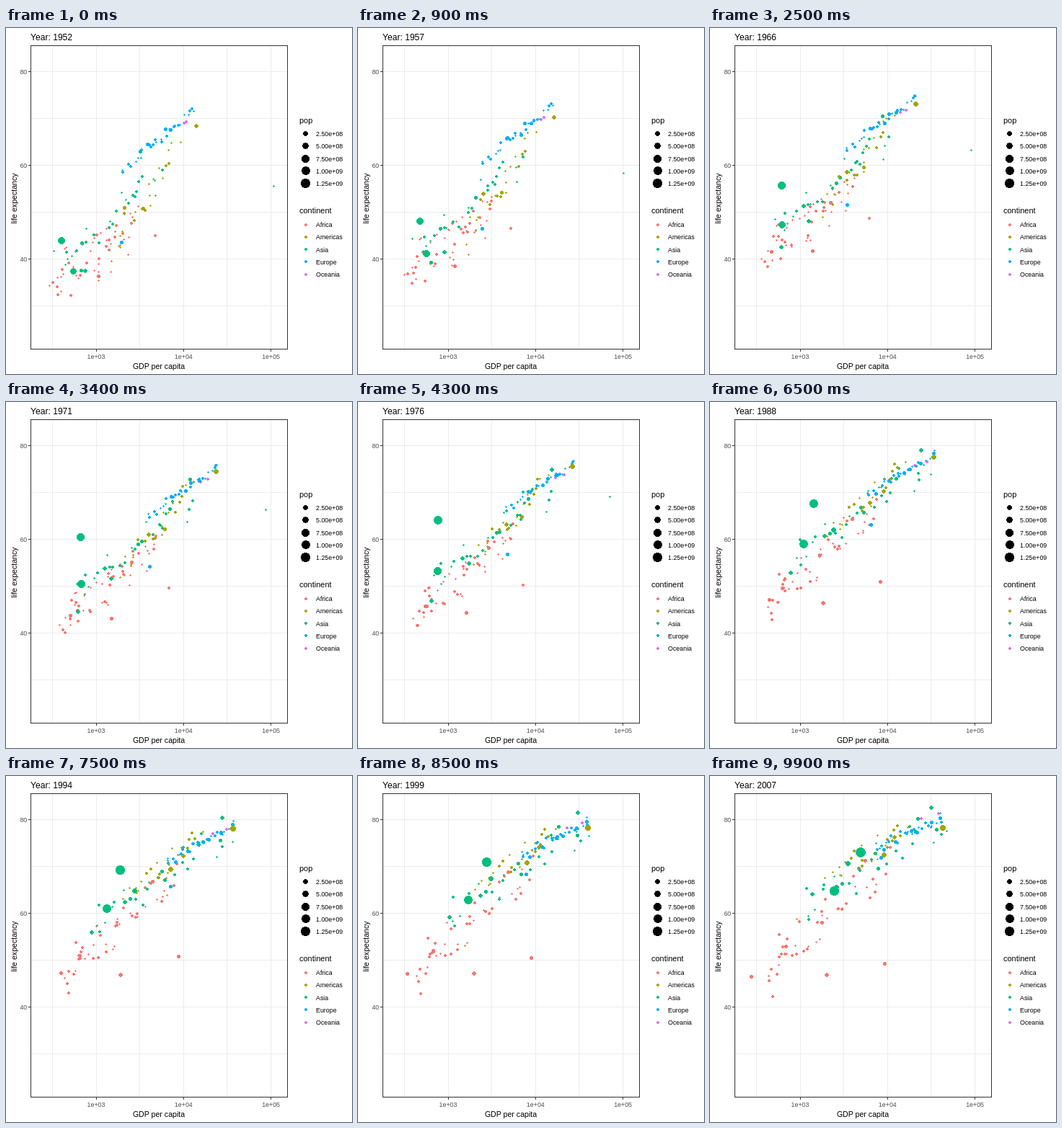
Write an HTML page with a canvas that moves like this. It is 480 px wide and 480 px high and loops after 10 s.

```html
<!DOCTYPE html>
<html lang="en">
<head>
<meta charset="utf-8">
<title>Life expectancy and GDP</title>
<style>
  html, body { margin: 0; width: 100%; height: 100%; overflow: hidden; background: #fff; }
  canvas, svg { position: absolute; left: 0; top: 0; width: 480px; height: 480px; }
  text { font-family: "Liberation Sans", Arial, sans-serif; font-size: 8.9px; }
  .tick { fill: #4d4d4d; }
  .name { font-size: 10.6px; }
  .head { font-size: 11px; }
  #year { font-size: 12.1px; }
</style>
</head>
<body>
<canvas id="stage" width="480" height="480"></canvas>
<svg id="labels" viewBox="0 0 480 480">
  <text id="year" x="34" y="17">Year: 1952</text>
  <text class="name" x="212" y="473" text-anchor="middle">GDP per capita</text>
  <text class="name" transform="translate(15 236.5) rotate(-90)" text-anchor="middle">life expectancy</text>
  <text class="head" x="407" y="132">pop</text>
  <text class="head" x="407" y="257">continent</text>
</svg>
<script>
const ctx = document.getElementById('stage').getContext('2d');
const labels = document.getElementById('labels');
const yearText = document.getElementById('year');

const LOOP = 10000, STEP = 100, LAST = 99;

// Small dots of a continent run from poor to rich along a line, with noise in years of life.
// start, end: lowest and highest log10 GDP, then the matching life expectancy.
// bend: extra log10 GDP and years of life mid-way; born: starting share of the final population.
const groups = {
  Africa: {
    color: '#F8766D', n: 46, pop: 13, born: 0.28, skew: 1.5, noise: 7, bend: [0.24, 14],
    start: [2.5, 3.5, 35, 46], end: [2.65, 4.05, 47, 70]
  },
  Americas: {
    color: '#A3A500', n: 22, pop: 12, born: 0.4, skew: 1, noise: 3.5, bend: [0.28, 12],
    start: [3.15, 3.95, 41, 65], end: [3.3, 4.25, 68, 78]
  },
  Asia: {
    color: '#00BF7D', n: 26, pop: 24, born: 0.42, skew: 1, noise: 5, bend: [0.3, 12],
    start: [2.55, 3.75, 38, 59], end: [2.95, 4.65, 60, 80]
  },
  Europe: {
    color: '#00B0F6', n: 28, pop: 16, born: 0.75, skew: 1, noise: 1.8, bend: [0.45, 4],
    start: [3.3, 4.15, 59, 72], end: [3.85, 4.65, 73.5, 81]
  },
  Oceania: {
    color: '#E76BF3', n: 2, pop: 12, born: 0.45, skew: 1, noise: 0, bend: [0.25, -3],
    start: [4, 4.03, 69, 69.4], end: [4.35, 4.6, 80, 81.4]
  }
};

// Leading dots: population in millions, then GDP and life expectancy at evenly spaced times
const leaders = {
  Africa: [
    [135, 1077, 36.3, 2014, 46.9], [80, 1419, 41.9, 5581, 71.3], [76, 362, 34.1, 691, 52.9],
    [65, 781, 39.1, 278, 46.5], [44, 4725, 45, 9270, 49.3]
  ],
  Asia: [
    [1110, 547, 37.4, 834, 55.1, 2452, 64.7],
    [1319, 400, 44, 590, 53, 700, 63.5, 1215, 66.6, 2150, 70, 4959, 73],
    [224, 750, 37.5, 3541, 70.6], [169, 685, 43.4, 2606, 65.5],
    [150, 684, 37.5, 668, 48.5, 1391, 64.1], [127, 3217, 63, 18000, 76.2, 31656, 82.6],
    [3, 108382, 55.6, 92500, 61.4, 85500, 68.3, 29000, 73, 39000, 75.9, 47307, 77.6]
  ],
  Oceania: [],
  Europe: [[82, 7144, 67.5, 32170, 79.4], [71, 1969, 43.6, 8458, 71.8]],
  Americas: [
    [190, 2109, 50.9, 9066, 72.4], [109, 3478, 50.8, 11978, 76.2], [301, 13990, 68.4, 42952, 78.2]
  ]
};

let seed = 11;
function rand() {
  seed = (seed * 16807) % 2147483647;
  return seed / 2147483647;
}
const spread = () => rand() + rand() - 1;
const mix = (a, b, t) => a + (b - a) * t;

function along([poor, rich, low, high], u, noise) {
  return [mix(poor, rich, u) + spread() * noise / 50, mix(low, high, u) + spread() * noise];
}

const dots = [];
for (const name in leaders) {
  const group = groups[name];
  for (let i = 0; i < group.n; i++) {
    const u = (i + rand()) / group.n;
    const points = [
      along(group.start, u, group.noise),
      along(group.end, Math.pow(u, group.skew), group.noise)
    ];
    dots.push({ group, points, pop: group.pop * 3 * rand() ** 2 });
  }
  for (const [pop, ...row] of leaders[name]) {
    const points = [];
    for (let i = 0; i < row.length; i += 2) points.push([Math.log10(row[i]), row[i + 1]]);
    dots.push({ group, points, pop });
  }
}

const xAt = log => 125 + 121.3 * (log - 3);
const yAt = life => 580.5 - 6.5 * life;
const radius = pop => 1.42 + 5.33 * Math.sqrt(pop / 1319);

function place(dot, t, axis) {
  const p = dot.points, n = p.length - 1;
  if (n > 2) {
    const i = Math.min(n - 1, Math.floor(t * n));
    return mix(p[i][axis], p[i + 1][axis], t * n - i);
  }
  const a = p[0][axis], b = p[n][axis];
  const bend = n === 2 ? 4 * p[1][axis] - 2 * (a + b) : dot.group.bend[axis];
  return mix(a, b, t) + bend * t * (1 - t);
}

// Hard-edged disc on whole pixels
function disc(x, y, r, color) {
  const d = Math.max(3, Math.round(2 * r)), h = d / 2;
  const left = Math.round(x - h), top = Math.round(y - h);
  ctx.fillStyle = color;
  for (let j = 0; j < d; j++) {
    const dy = j + 0.5 - h;
    let inset = 0;
    while (inset < h && (inset + 0.5 - h) ** 2 + dy * dy > h * h - 0.6) inset++;
    if (d > 2 * inset) ctx.fillRect(left + inset, top + j, d - 2 * inset, 1);
  }
}

function label(text, x, y, anchor, cls) {
  const el = document.createElementNS(labels.namespaceURI, 'text');
  el.setAttribute('x', x);
  el.setAttribute('y', y);
  el.setAttribute('text-anchor', anchor);
  if (cls) el.setAttribute('class', cls);
  el.textContent = text;
  labels.append(el);
}

const names = Object.keys(groups);
const sizes = [250, 500, 750, 1000, 1250];
const sizeY = i => 146.5 + 17.25 * i;
const nameY = i => 272.5 + 17.25 * i;

[3, 4, 5].forEach(e => label('1e+0' + e, xAt(e), 459, 'middle', 'tick'));
[40, 60, 80].forEach(v => label(v, 29.3, yAt(v) + 3.8, 'end', 'tick'));
sizes.forEach((p, i) => label((p * 1e6).toExponential(2).replace(/\+(\d)$/, '+0$1'), 430, sizeY(i) + 3.5, 'start'));
names.forEach((n, i) => label(n, 430, nameY(i) + 3.5, 'start'));

function drawBack() {
  ctx.fillStyle = '#fff';
  ctx.fillRect(0, 0, 480, 480);
  ctx.fillStyle = '#ebebeb';
  for (let e = 2.5; e <= 5; e += 0.5) ctx.fillRect(Math.floor(xAt(e)), 25, 1, 420);
  for (let v = 30; v <= 80; v += 10) ctx.fillRect(35, Math.floor(yAt(v)), 355, 1);
}

function drawFrame() {
  ctx.strokeStyle = ctx.fillStyle = '#333';
  ctx.lineWidth = 1;
  ctx.strokeRect(34.5, 24.5, 356, 421);
  for (const e of [3, 4, 5]) ctx.fillRect(Math.floor(xAt(e)), 446, 1, 3);
  for (const v of [40, 60, 80]) ctx.fillRect(31, Math.floor(yAt(v)), 3, 1);
  sizes.forEach((p, i) => disc(415.5, sizeY(i), radius(p), '#000'));
  names.forEach((n, i) => disc(415.5, nameY(i), 2, groups[n].color));
}

function draw() {
  const t = Math.floor(performance.now() % LOOP / STEP) / LAST;
  drawBack();
  for (const dot of dots) {
    const pop = dot.pop * mix(dot.group.born, 1, t);
    disc(xAt(place(dot, t, 0)), yAt(place(dot, t, 1)), radius(pop), dot.group.color);
  }
  drawFrame();
  yearText.textContent = 'Year: ' + Math.round(mix(1952, 2007, t));
  requestAnimationFrame(draw);
}
draw();
</script>
</body>
</html>
```
